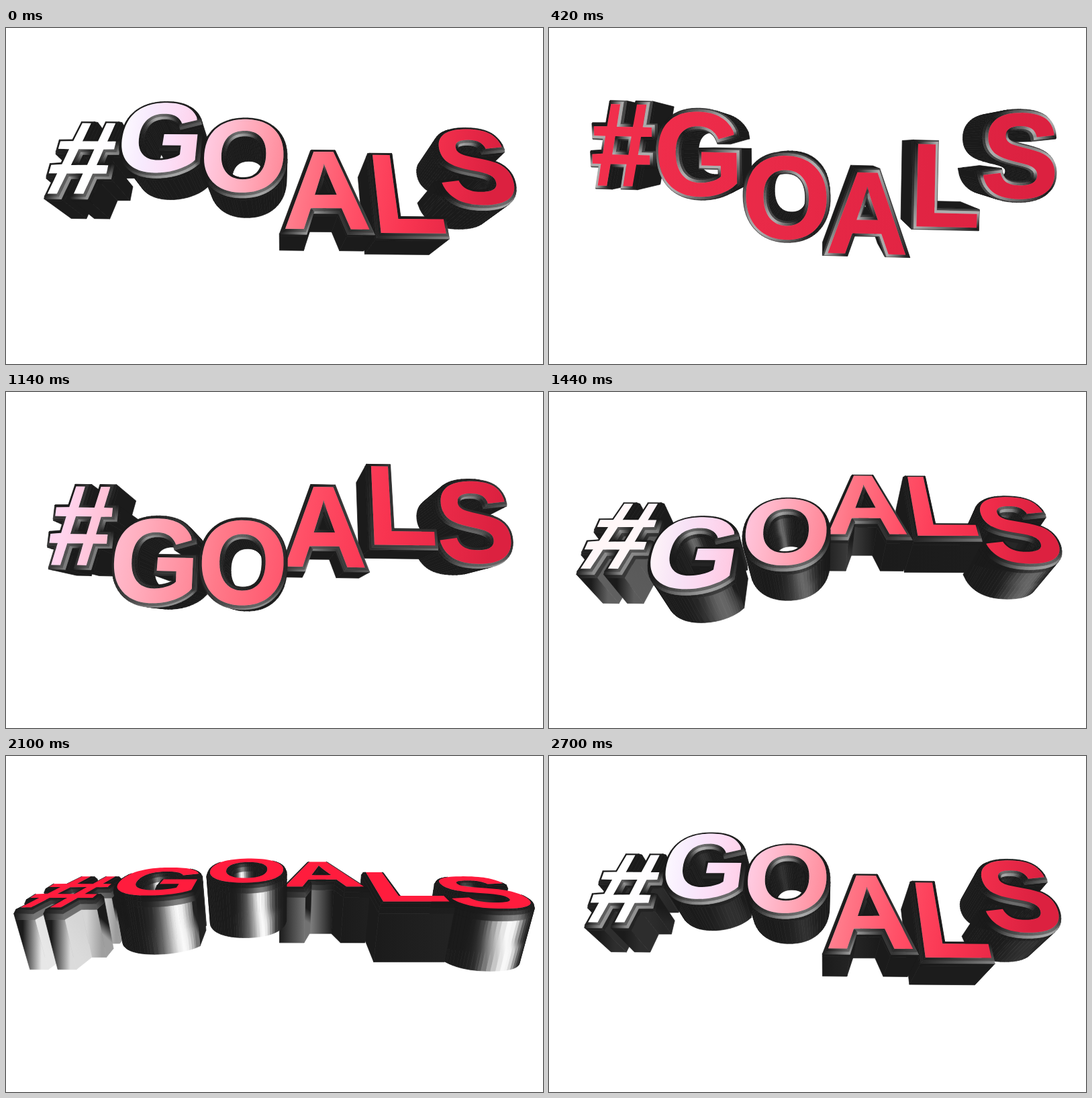
Recreate the animation shown at these times as an HTML page with a canvas. Size 800 px wide and 500 px high, loop 2.76 s.

```html
<!DOCTYPE html>
<html lang="en">
<head>
<meta charset="utf-8">
<title>#GOALS</title>
<style>
  html, body { margin: 0; width: 100%; height: 100%; overflow: hidden; background: #fff; }
  canvas { display: block; }
</style>
</head>
<body>
<canvas id="stage" width="800" height="500"></canvas>
<script>
const LOOP = 2760, STEP = 60, CAMERA = 600, BASELINE = 57, WAVE = 46.5;
const ctx = document.getElementById('stage').getContext('2d');
ctx.lineJoin = 'round';

// Cross-section of the bevelled edge: [outward offset, depth].
const RINGS = [[.6, -42], [4, -40.5], [6, -36], [6, -28], [6, 43]];
const RED = [255, 28, 61];
const SHEEN = [
  [0, 220, 33, 64], [.18, 248, 51, 80], [.3, 255, 74, 98], [.45, 255, 120, 136],
  [.6, 255, 176, 192], [.74, 255, 216, 242], [.85, 246, 236, 255], [.92, 255, 255, 255], [1.1, 255, 255, 255]
];

const smooth = (a, b, v) => {
  const t = Math.min(1, Math.max(0, (v - a) / (b - a)));
  return t * t * (3 - 2 * t);
};
const mix = (a, b, t) => a.map((v, i) => v + (b[i] - v) * t);
const rgb = c => `rgb(${c.map(Math.round)})`;
const grey = v => rgb([v, v, v]);

function simplify(pts, tolerance) {
  if (pts.length < 3) return pts;
  const [ax, ay] = pts[0], [bx, by] = pts[pts.length - 1];
  const len = Math.hypot(bx - ax, by - ay);
  let far = 0, best = 0;
  pts.forEach(([x, y], i) => {
    const d = len < 1e-6
      ? Math.hypot(x - ax, y - ay)
      : Math.abs((bx - ax) * (y - ay) - (by - ay) * (x - ax)) / len;
    if (d > best) { best = d; far = i; }
  });
  if (best < tolerance) return [pts[0], pts[pts.length - 1]];
  return [...simplify(pts.slice(0, far + 1), tolerance).slice(0, -1),
          ...simplify(pts.slice(far), tolerance)];
}

// Marching squares over a large rendering of the glyph; inside lies to the right.
function traceGlyph(char) {
  const W = 640, ZOOM = 4, BASE = 540;
  const sheet = document.createElement('canvas');
  sheet.width = sheet.height = W;
  const pen = sheet.getContext('2d', { willReadFrequently: true });
  pen.font = `bold ${160 * ZOOM}px "Liberation Sans", Arial, sans-serif`;
  pen.textAlign = 'center';
  pen.fillText(char, W / 2, BASE);
  const data = pen.getImageData(0, 0, W, W).data;
  const alpha = i => data[i * 4 + 3];

  const next = new Map();
  for (let y = 0; y < W - 1; y++) for (let x = 0; x < W - 1; x++) {
    const i = y * W + x;
    const inside = [i, i + 1, i + W + 1, i + W].map(k => alpha(k) > 127);
    if (inside.every(v => v === inside[0])) continue;
    const edges = [2 * i, 2 * (i + 1) + 1, 2 * (i + W), 2 * i + 1];
    for (let e = 0; e < 4; e++) {
      if (!inside[e] || inside[(e + 1) % 4]) continue;
      let end = (e + 1) % 4;
      while (inside[end] || !inside[(end + 1) % 4]) end = (end + 1) % 4;
      next.set(edges[e], edges[end]);
    }
  }

  const toPoint = key => {
    const i = key >> 1, down = key & 1, j = i + (down ? W : 1);
    const t = (127.5 - alpha(i)) / (alpha(j) - alpha(i));
    return [i % W + (down ? 0 : t), Math.floor(i / W) + (down ? t : 0)];
  };
  const loops = [];
  while (next.size) {
    const loop = [];
    let key = next.keys().next().value;
    while (next.has(key)) {
      loop.push(toPoint(key));
      const following = next.get(key);
      next.delete(key);
      key = following;
    }
    // Points almost on top of each other would blunt the corners.
    loops.push(simplify([...loop, loop[0]], .32).slice(0, -1).filter(([x, y], i, all) => {
      const [u, v] = all[(i + 1) % all.length];
      return Math.hypot(u - x, v - y) > 5;
    }));
  }

  const xs = loops.flat().map(p => p[0]);
  const middle = (Math.min(...xs) + Math.max(...xs)) / 2;
  return loops.filter(l => l.length > 2).map(loop => withNormals(loop.map(([x, y]) =>
    [(x - middle) / ZOOM, (y - BASE) / ZOOM * 1.03 + BASELINE])));
}

// Adds the mitre (mx, my) and the unit vertex normal (nx, ny).
function withNormals(loop) {
  const n = loop.length;
  const normals = loop.map(([x, y], i) => {
    const [u, v] = loop[(i + 1) % n], len = Math.hypot(u - x, v - y) || 1;
    return [(v - y) / len, (x - u) / len];
  });
  return loop.map(([x, y], i) => {
    const [ax, ay] = normals[(i + n - 1) % n], [bx, by] = normals[i];
    const sx = ax + bx, sy = ay + by, len = Math.hypot(sx, sy) || 1;
    const k = 1 / Math.max(.4, 1 + ax * bx + ay * by);
    return { x, y, nx: sx / len, ny: sy / len, mx: sx * k, my: sy * k };
  });
}

// Outer letters first, so that the inner ones overlap them.
const letters = [['#', -280], ['S', 268], ['G', -175], ['L', 171], ['A', 60.5], ['O', -52]]
  .map(([char, x]) => ({ x, loops: traceGlyph(char) }));

function polygon(points) {
  points.forEach(([x, y], i) => i ? ctx.lineTo(x, y) : ctx.moveTo(x, y));
  ctx.closePath();
}

function shade(band, { nx, ny }, x, tilt) {
  const high = smooth(25, 55, tilt);
  const lit = high * smooth(-.2, .2, ny) * Math.exp(-(((nx - .33 + .0007 * x) / .28) ** 2));
  if (band > 1) return 27 + (band === 2 ? 100 : 222) * lit;
  const low = 1 - smooth(0, 15, tilt);
  const mid = (1 - low) * (1 - smooth(30, 60, tilt));
  return 26 + low * (band ? 45 : 150) * (.7 * nx - .7 * ny) ** 2
    + mid * (band ? 190 : 110) * Math.max(0, .85 * ny + .3 * nx) ** 3
    + (band ? 40 : 10) * lit;
}

function faceFill(tilt) {
  const gradient = ctx.createLinearGradient(90, 150, 720, 250);
  const power = .13 + .9 * smooth(-6, 22, tilt), flat = smooth(34, 58, tilt);
  for (let i = 0; i <= 16; i++) {
    const v = power * (1 - i / 16);
    const k = SHEEN.findIndex(s => s[0] > v), a = SHEEN[k - 1], b = SHEEN[k];
    const color = mix(a.slice(1), b.slice(1), (v - a[0]) / (b[0] - a[0]));
    gradient.addColorStop(i / 16, rgb(mix(color, RED, flat)));
  }
  return gradient;
}

// Fills a quad a, b, c, d with one grey along side a-d and another along b-c.
function drawQuad({ points, from, to }) {
  let fill = grey(from);
  if (Math.abs(from - to) > 1) {
    const [a, b, c, d] = points;
    fill = ctx.createLinearGradient((a[0] + d[0]) / 2, (a[1] + d[1]) / 2, (b[0] + c[0]) / 2, (b[1] + c[1]) / 2);
    fill.addColorStop(0, grey(from));
    fill.addColorStop(1, grey(to));
  }
  ctx.fillStyle = ctx.strokeStyle = fill;
  ctx.beginPath();
  polygon(points);
  ctx.fill();
  ctx.stroke();
}

function draw(time) {
  const turn = ms => 2 * Math.PI * (time - ms) / LOOP;
  const swing = Math.cos(turn(655));
  const tilt = 28.5 - 38.5 * swing, rock = .01 * (1 + swing);
  const sin = Math.sin(tilt * Math.PI / 180), cos = Math.cos(tilt * Math.PI / 180);
  const project = (x, y, z) => {
    y += rock * x;
    z -= rock * x;
    const depth = z * cos - y * sin, scale = CAMERA / (CAMERA + depth);
    return [409 + x * scale, 223 + (y * cos + z * sin) * scale, depth];
  };
  const face = faceFill(tilt);
  ctx.fillStyle = '#fff';
  ctx.fillRect(0, 0, 800, 500);
  ctx.lineWidth = .7;

  for (const letter of letters) {
    const lift = WAVE * Math.cos(letter.x * Math.PI / 285 + turn(600));
    const rings = RINGS.map(([offset, z]) => letter.loops.map(loop => loop.map(p =>
      project(letter.x + p.x + p.mx * offset, p.y + p.my * offset + lift, z))));

    for (let band = RINGS.length - 2; band >= 0; band--) {
      const quads = [];
      letter.loops.forEach((loop, l) => {
        const front = rings[band][l], back = rings[band + 1][l];
        const tones = loop.map(p => shade(band, p, letter.x + p.x, tilt));
        loop.forEach((p, i) => {
          const j = (i + 1) % loop.length;
          const points = [front[i], front[j], back[j], back[i]], [a, b, c, d] = points;
          const facing = (c[0] - a[0]) * (d[1] - b[1]) - (c[1] - a[1]) * (d[0] - b[0]);
          if (facing < 0) quads.push({ points, depth: a[2] + b[2] + c[2] + d[2], from: tones[i], to: tones[j] });
        });
      });
      quads.sort((a, b) => b.depth - a.depth).forEach(drawQuad);
    }
    ctx.fillStyle = face;
    ctx.beginPath();
    rings[0].forEach(polygon);
    ctx.fill('evenodd');
  }
}

let shown = -1;
function tick() {
  const time = Math.floor(performance.now() % LOOP / STEP) * STEP;
  if (time !== shown) draw(shown = time);
  requestAnimationFrame(tick);
}
tick();
</script>
</body>
</html>
```
